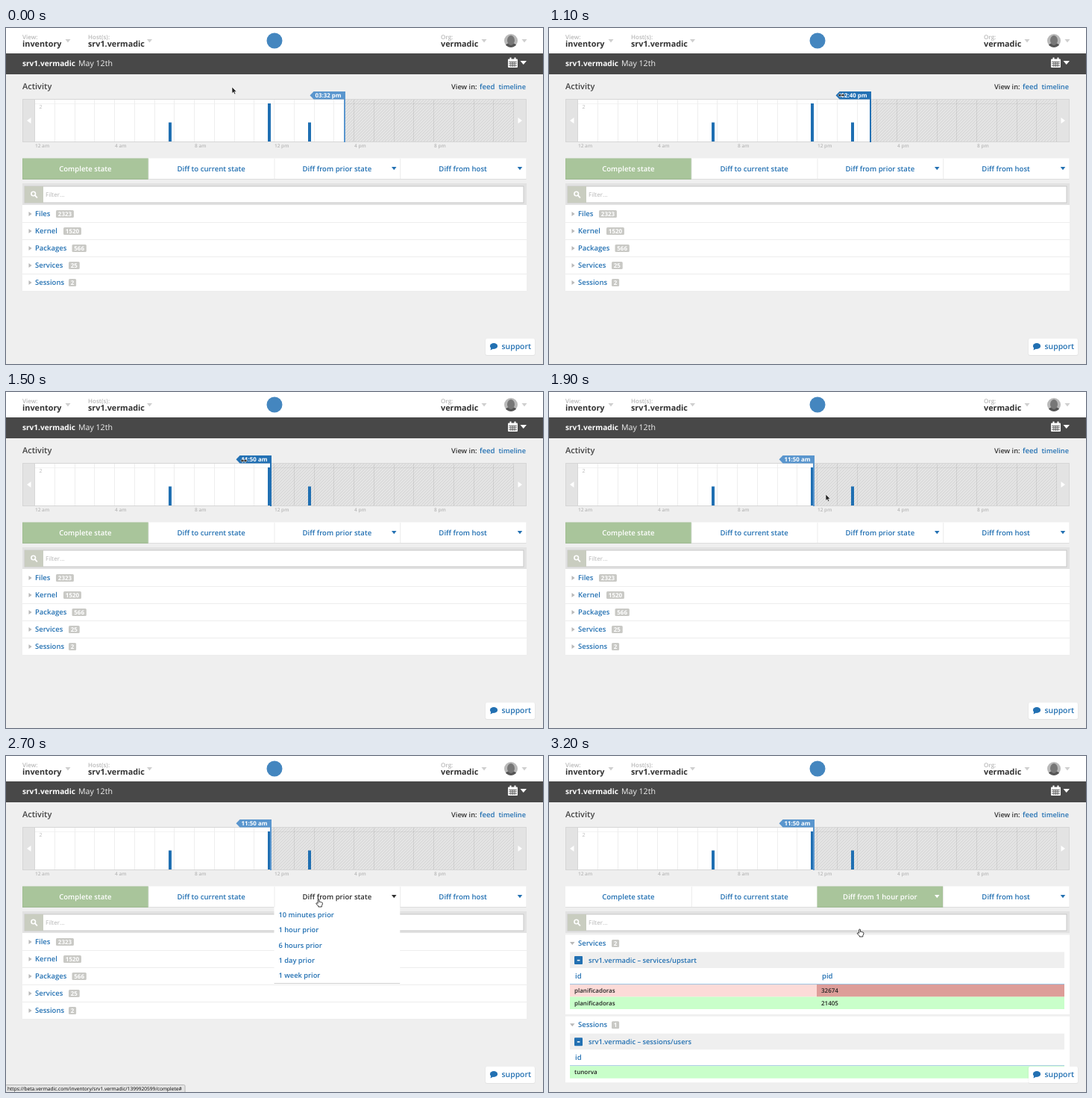
An HTML page for the animation above (5.2 s loop, 720 px wide and 450 px high).

```html
<!DOCTYPE html>
<html lang="en">
<head>
<meta charset="utf-8">
<title>Host inventory</title>
<style>
  html, body { margin: 0; width: 100%; height: 100%; overflow: hidden; background: #efefef; }
  svg { display: block; width: 720px; height: 450px; }
  text { font-family: "Open Sans", "Noto Sans", sans-serif; text-rendering: geometricPrecision; white-space: pre; }
</style>
</head>
<body>
<svg id="stage" viewBox="0 0 720 450"></svg>
<script>
const LOOP = 5200;
const BLUE = '#2270b2', DARK = '#333', GREEN = '#a9c59b', PAGE = '#efefef';
const HOST = 'srv1.vermadic';
const HOUR = 26.75, CHART_X = 39, CHART_END = 681;
const TAB = 168.75, ITEM = 20.3;

// Each step: start time, pointer, x, y, and the settings that change there.
const STEPS = [
  [0, 'arrow', 303, 79, { minutes: 932, grab: false, hover: false, menu: false, pick: -1, result: false }],
  [500, 'arrow', 307, 80],
  [600, 'arrow', 328, 82],
  [700, 'arrow', 360, 85],
  [800, 'arrow', 392, 88],
  [900, 'resize', 411, 90, { grab: true }],
  [1000, 'resize', 415, 90],
  [1100, 'resize', 392, 90, { minutes: 880 }],
  [1200, 'resize', 370, 90, { minutes: 832 }],
  [1300, 'resize', 348, 91, { minutes: 783 }],
  [1400, 'resize', 328, 91, { minutes: 737 }],
  [1500, 'resize', 319, 92, { minutes: 710 }],
  [1700, 'arrow', 326, 99, { grab: false }],
  [1800, 'arrow', 345, 114],
  [1900, 'arrow', 371, 137],
  [2000, 'arrow', 395, 160],
  [2100, 'hand', 411, 176, { hover: true }],
  [2200, 'hand', 416, 181],
  [2300, 'hand', 417, 183],
  [2400, 'hand', 417, 184, { menu: true }],
  [2500, 'hand', 418, 186],
  [2600, 'hand', 419, 189],
  [2700, 'hand', 420, 192],
  [2800, 'hand', 418, 208, { pick: 0 }],
  [2900, 'hand', 416.5, 226, { pick: 1 }],
  [3200, 'hand', 417.5, 232, { hover: false, menu: false, pick: -1, result: true }]
];

const rect = (x, y, w, h, fill, more = '') =>
  `<rect x="${x}" y="${y}" width="${w}" height="${h}" fill="${fill}" ${more}/>`;
const text = (x, y, str, size, fill = BLUE, weight = 600, anchor = 'start') =>
  `<text x="${x}" y="${y}" font-size="${size}" fill="${fill}" font-weight="${weight}" text-anchor="${anchor}">${str}</text>`;
const path = (d, fill, more = '') => `<path d="${d}" fill="${fill}" ${more}/>`;
const circle = (x, y, r, fill, more = '') => `<circle cx="${x}" cy="${y}" r="${r}" fill="${fill}" ${more}/>`;
const down = (x, y, w, h, fill) => path(`M${x} ${y}h${w}l${-w / 2} ${h}z`, fill);
const at = (x, y, body) => `<g transform="translate(${x} ${y})">${body}</g>`;

function picker(x, label, value, caretX) {
  return text(x, 14.5, label, 8, '#b8b8b8') + text(x, 25, value, 10.8, DARK, 700) +
    down(caretX, 15, 7, 4.5, '#cfcfcf');
}

function header() {
  const calendar = rect(673, 41.5, 13, 11.5, '#fff', 'rx="1"') +
    rect(675.5, 39.5, 2, 3, '#fff') + rect(681.5, 39.5, 2, 3, '#fff') +
    path('M674 45.3h11M674 47.8h11M674 50.3h11M677 45v7M679.5 45v7M682 45v7', 'none',
      'stroke="#484848" stroke-width=".8"');
  const avatar = circle(677, 17, 9, '#b9b9b9') +
    `<g clip-path="url(#face)">${path('M668 27v-3q4-4 9-4t9 4v3z', '#555')}` +
    `<ellipse cx="677" cy="16.5" rx="5" ry="6.5" fill="#777"/></g>`;
  return rect(0, 0, 720, 34, '#fff') +
    picker(22, 'View:', 'inventory', 79.5) +
    picker(110, 'Host(s):', HOST, 189) +
    picker(583, 'Org:', 'vermadic', 637.5) +
    circle(360, 17, 10.5, '#4486bf') + avatar + down(691.5, 15, 7, 4.5, '#cfcfcf') +
    rect(0, 34, 720, 28, '#484848') +
    text(22, 51.3, HOST, 10.1, '#fff', 700) + text(97, 51.3, 'May 12th', 10.6, '#f0f0f0', 400) +
    calendar + down(689.5, 44, 8.5, 5, '#fff') +
    text(22, 82, 'Activity', 11, '#444') +
    text(597, 82, 'View in:', 9.3, '#333') + text(635, 82, 'feed', 9.6) + text(660.5, 82, 'timeline', 9.2);
}

function clock(minutes) {
  const h = Math.floor(minutes / 60), pad = n => String(n).padStart(2, '0');
  return `${pad(h % 12 || 12)}:${pad(minutes % 60)} ${h < 12 ? 'am' : 'pm'}`;
}

function chart({ minutes, grab }) {
  const now = Math.ceil(CHART_X + minutes / 60 * HOUR);
  let out = rect(22, 95, 676, 58, '#d6d6d6') + rect(23, 96, 674, 56, '#e3e3e3') +
    rect(CHART_X, 96, CHART_END - CHART_X, 56, '#fff') +
    rect(now, 96, CHART_END - now, 56, 'url(#hatch)') +
    rect(CHART_X, 101, CHART_END - CHART_X, 1, 'rgba(0,0,0,.05)');
  for (let h = 1; h <= 24; h++) {
    const x = Math.round(CHART_X + h * HOUR) - 1;
    out += rect(x, 96, 1, 56, x > now ? 'rgba(0,0,0,.07)' : '#eeeeee');
  }
  out += rect(CHART_X - 1, 96, 1, 56, '#d6d6d6') +
    path('M33.5 120v8l-5.5-4z', '#fff') + path('M686.5 120v8l5.5-4z', '#fff') +
    text(44.5, 108, '2', 7, '#bbb', 400);
  ['12 am', '4 am', '8 am', '12 pm', '4 pm', '8 pm'].forEach((label, i) => {
    out += text(39 + i * 4 * HOUR, 159.5, label, 6.5, '#b8b8b8');
  });
  for (const [x, y] of [[218, 126.5], [351, 101], [405, 126.5]]) out += rect(x, y, 4, 152 - y, '#1f6fb2');
  const tone = grab ? '#2371b4' : '#5a96ce';
  return out + at(now, 0, rect(-2, 85, 2, 68, tone) +
    path('M-47.5 90.2L-42.5 85H0V95.5H-42.5z', tone) +
    text(-23, 93.2, clock(minutes), 7.9, '#fff', 700, 'middle'));
}

function tabs({ hover, result }) {
  const active = result ? 2 : 0;
  const labels = ['Complete state', 'Diff to current state',
    result ? 'Diff from 1 hour prior' : 'Diff from prior state', 'Diff from host'];
  let out = rect(22, 175, 675.5, 28, '#dedede') + rect(22, 174.5, 675.5, 27.5, '#fff');
  labels.forEach((label, i) => {
    const x = 22 + i * TAB, on = i === active;
    const ink = on ? '#fff' : i === 2 && hover ? '#2f2f2f' : BLUE;
    if (on) out += rect(x, 174.5, TAB, 28.3, '#98b68a') + rect(x + 0.5, 175, TAB - 1, 26.8, GREEN);
    else if (i) out += rect(x, 175, 1, 27, '#ececec');
    out += text(x + TAB / 2, 192, label, 9.6, ink, 600, 'middle');
    if (i > 1) out += down(x + 157.5, 186, 6.5, 4.2, ink);
  });
  return out;
}

function filterBar() {
  return rect(22, 208, 676, 29, '#e2e2e2') + rect(24.5, 211.5, 670, 23, '#c8c8c8') +
    rect(25, 212, 25, 22, '#c9cdc0') + rect(50, 212.5, 643.5, 21, '#fff') +
    circle(36.7, 222, 2.8, 'none', 'stroke="#fff" stroke-width="1.6"') +
    path('M38.8 224.2l2.6 2.6', 'none', 'stroke="#fff" stroke-width="1.9" stroke-linecap="round"') +
    text(53, 225.8, 'Filter...', 8.1, '#b5b5b5', 400);
}

function rowTitle(name, badgeX, count, y) {
  const w = 5.5 + String(count).length * 4.6;
  return text(39, y + 3.2, name, 9.5) + rect(badgeX, y - 5, w, 10, '#c9c9c5', 'rx="1.5"') +
    text(badgeX + w / 2, y + 3, count, 8, '#fff', 700, 'middle');
}

function categories() {
  const rows = [['Files', 67, 2323], ['Kernel', 77, 1520], ['Packages', 88.5, 566], ['Services', 84, 25], ['Sessions', 84, 2]];
  return rect(22, 237, 676, 115, '#fff') + rows.map(([name, x, count], i) => {
    const y = 249 + i * 23;
    return rowTitle(name, x, count, y) + path(`M30.5 ${y - 3}v6l4-3z`, '#b8b8b8') +
      rect(22, y + 11, 676, 1, '#ededed');
  }).join('');
}

function diffPanel(top, height, name, count, key, columns, rows) {
  const cellX = [28, 359];
  let out = rect(0, 0, 676, height, '#fff') + rect(6, 23, 663, 21.5, PAGE);
  out = at(22, top, out) + rowTitle(name, 84, count, top + 11.5) +
    down(28, top + 9.5, 6.5, 4, '#b8b8b8') +
    rect(34, top + 28.5, 11, 11, BLUE, 'rx="1"') + rect(37.8, top + 33.4, 3.6, 1.5, '#fff') +
    text(53, top + 37.3, `${HOST} – ${key}`, 9.3) +
    rect(28, top + 65.5, 663, 1, '#9dc4e2');
  columns.forEach((label, i) => { out += text(cellX[i] + 7, top + 58.5, label, 9.5); });
  rows.forEach(({ cells, fills }, r) => {
    const y = top + 66.5 + r * 16.5;
    out += rect(28, y, 663, 16.5, fills[0]);
    if (fills[1]) out += rect(359, y, 332, 16.5, fills[1]);
    cells.forEach((value, i) => { out += text(cellX[i] + 6, y + 11, value, 8, '#222'); });
  });
  return out;
}

function diffs() {
  const added = ['#c9ffca'], user = 'planificadoras';
  return diffPanel(239.5, 106.5, 'Services', 2, 'services/upstart', ['id', 'pid'], [
    { cells: [user, '32674'], fills: ['#fcdbd8', '#dd9d99'] },
    { cells: [user, '21405'], fills: added }
  ]) + diffPanel(348.7, 88.5, 'Sessions', 1, 'sessions/users', ['id'], [{ cells: ['tunorva'], fills: added }]);
}

function menu(pick) {
  const x = 22 + 2 * TAB;
  const items = ['10 minutes', '1 hour', '6 hours', '1 day', '1 week'];
  return rect(x, 304, TAB, 1, '#d0d0d0') + rect(x, 202, TAB, 102, '#fff') +
    items.map((item, i) => {
      const on = i === pick;
      return (on ? rect(x, 202.2 + i * ITEM, TAB, ITEM, '#2a74b3') : '') +
        text(365.5, 216 + i * ITEM, item + ' prior', 9.3, on ? '#fff' : BLUE, on ? 700 : 600);
    }).join('');
}

function support() {
  return rect(642.5, 416, 67, 23, 'rgba(0,0,0,.05)', 'rx="2"') + rect(643, 416, 66, 22, '#fff', 'rx="2"') +
    `<ellipse cx="654" cy="426" rx="5.1" ry="3.9" fill="${BLUE}"/>` +
    path('M650.3 427.5l-.8 4 4-2z', BLUE) + text(664.5, 429.8, 'support', 10.4);
}

function statusBar() {
  return rect(-1, 440.5, 241, 11, '#e4e4e4', 'stroke="#b5b5b5" stroke-width="1" rx="1.5"') +
    text(2, 447.6, `https://beta.vermadic.com/inventory/${HOST}/1399920599/complete#`, 6.6, '#000', 500);
}

const POINTERS = {
  arrow: path('M0 0v8.6l2-1.8 1.4 3 1.5-.7-1.4-2.9h2.7z', '#222', 'stroke="#fff" stroke-width=".6"'),
  resize: path('M-4.5 0l3-2.7v1.8h3v-1.8l3 2.7-3 2.7v-1.8h-3v1.8z', '#222', 'stroke="#fff" stroke-width=".6"'),
  hand: path('M-1.8 5.3V1q0-1 .9-1t.9 1v2.5q1-.6 1.6.2 1-.4 1.5.4 1.3-.2 1.3 1.2 0 2-1.1 3.2V10h-4.5V8.8L-4 6.3q-.6-1.5.6-1.5z',
    '#fff', 'stroke="#222" stroke-width=".9" stroke-linejoin="round"')
};

const DEFS = `<defs>
  <clipPath id="face"><circle cx="677" cy="17" r="9"/></clipPath>
  <pattern id="hatch" width="4" height="4" patternUnits="userSpaceOnUse">
    <rect width="4" height="4" fill="#e4e4e4"/>
    <path d="M-1 1l2-2M0 4l4-4M3 5l2-2" stroke="#d3d3d3" stroke-width=".9"/>
  </pattern></defs>`;

function scene(index) {
  const state = Object.assign({}, ...STEPS.slice(0, index + 1).map(step => step[4]));
  const [, pointer, x, y] = STEPS[index];
  return DEFS + rect(0, 0, 720, 450, PAGE) + header() + chart(state) + tabs(state) + filterBar() +
    (state.result ? diffs() : categories()) + (state.menu ? menu(state.pick) : '') +
    support() + (state.hover ? statusBar() : '') + at(x, y, POINTERS[pointer]);
}

const stage = document.getElementById('stage');
let shown = -1;
function draw(now) {
  const time = now % LOOP;
  const index = STEPS.findLastIndex(step => step[0] <= time);
  if (index !== shown) stage.innerHTML = scene(shown = index);
  requestAnimationFrame(draw);
}
draw(0);
</script>
</body>
</html>
```
